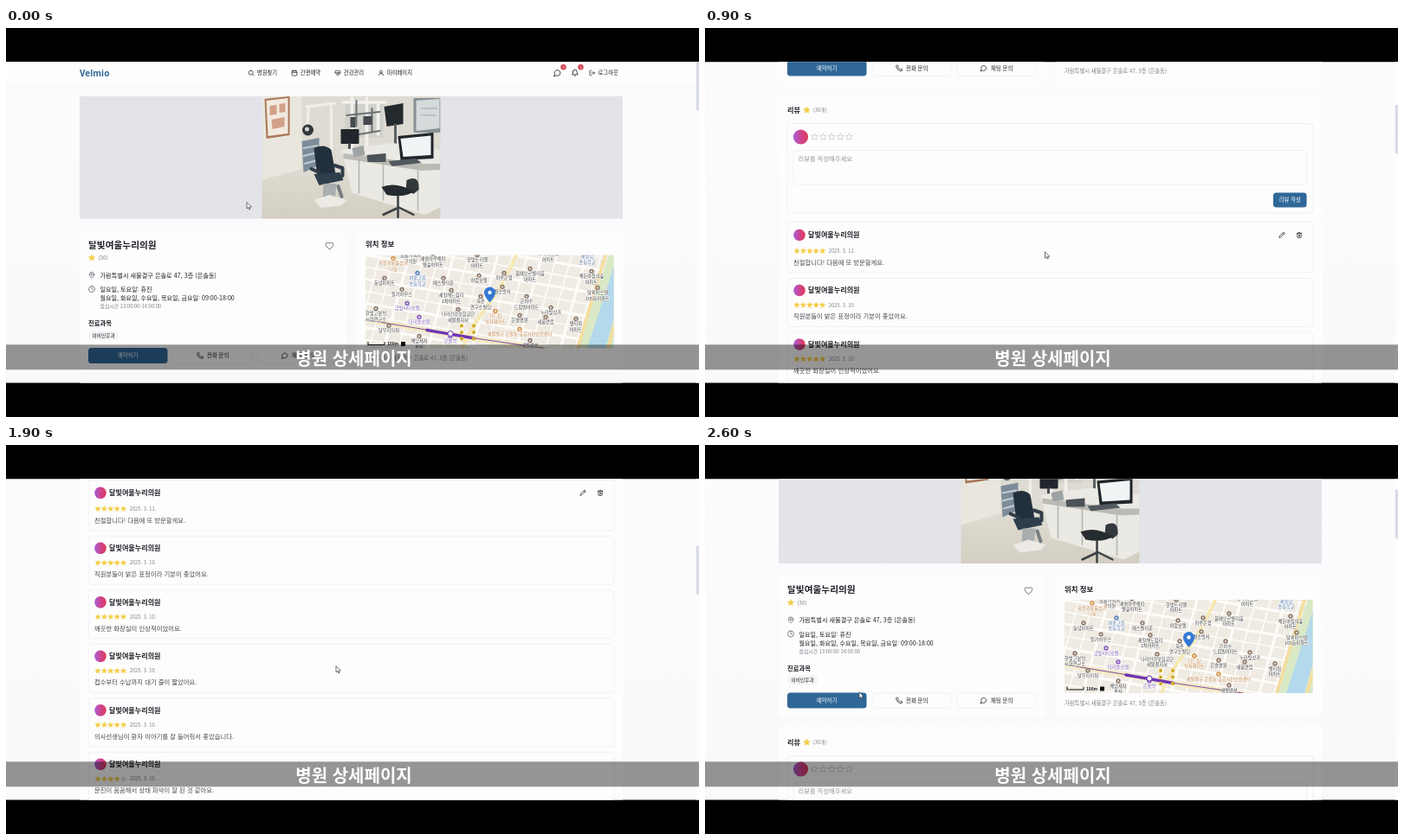
Animation of 800x450 px, one loop 2700 ms. Source, as an HTML page:

```html
<!DOCTYPE html>
<html lang="ko">
<head>
<meta charset="utf-8">
<title>병원 상세페이지</title>
<style>
  html, body { margin: 0; width: 100%; height: 100%; overflow: hidden; background: #000; }
  svg { display: block; width: 800px; height: 450px; }
  text { font-family: "Noto Sans CJK KR", "Noto Sans CJK JP", "Noto Sans CJK", "Noto Sans", sans-serif; }
  .brand { font-family: "Open Sans", "Noto Sans", sans-serif; }
</style>
</head>
<body>
<svg id="stage" viewBox="0 0 800 450" xmlns="http://www.w3.org/2000/svg"></svg>
<script>
const LOOP = 2700, STEP = 100;
const CLINIC = '달빛여울누리의원';
const ADDRESS = '가람특별시 새물결구 은솔로 47, 3층 (은솔동)';
const INK = '#1d1f25', GRAY = '#7b7f88', LINE = '#eeedf2', BLUE = '#2f6798', GOLD = '#f3cf4b';

const ICONS = {
  search: 'M11 3a8 8 0 1 0 0 16a8 8 0 1 0 0-16M21 21l-4.3-4.3',
  calendar: 'M8 2v4M16 2v4M3 10h18M5 4h14a2 2 0 0 1 2 2v14a2 2 0 0 1-2 2H5a2 2 0 0 1-2-2V6a2 2 0 0 1 2-2z',
  heart: 'M19 14c1.5-1.5 3-3.2 3-5.5A5.5 5.5 0 0 0 16.5 3c-1.8 0-3 .5-4.5 2-1.5-1.5-2.7-2-4.5-2A5.5 5.5 0 0 0 2 8.5c0 2.3 1.5 4 3 5.5l7 7Z',
  user: 'M12 13a5 5 0 1 0 0-10a5 5 0 1 0 0 10M20 21a8 8 0 0 0-16 0',
  chat: 'M7.9 20A9 9 0 1 0 4 16.1L2 22Z',
  bell: 'M6 8a6 6 0 0 1 12 0c0 7 3 9 3 9H3s3-2 3-9M10.3 21a2 2 0 0 0 3.4 0',
  logout: 'M9 21H5a2 2 0 0 1-2-2V5a2 2 0 0 1 2-2h4M16 17l5-5-5-5M21 12H9',
  pin: 'M20 10c0 6-8 12-8 12s-8-6-8-12a8 8 0 0 1 16 0ZM12 7a3 3 0 1 0 0 6a3 3 0 1 0 0-6',
  clock: 'M12 2a10 10 0 1 0 0 20a10 10 0 1 0 0-20M12 6v6l4 2',
  phone: 'M22 17v3a2 2 0 0 1-2.2 2A19.8 19.8 0 0 1 2.1 4.2 2 2 0 0 1 4.1 2h3a2 2 0 0 1 2 1.7c.1 1 .4 1.9.7 2.8a2 2 0 0 1-.5 2.1L8 10a16 16 0 0 0 6 6l1.4-1.3a2 2 0 0 1 2.1-.5c.9.3 1.8.6 2.8.7A2 2 0 0 1 22 17z',
  pencil: 'M17 3a2.8 2.8 0 0 1 4 4L7.5 20.5 2 22l1.5-5.5ZM15 5l4 4',
  trash: 'M3 6h18M19 6v14a2 2 0 0 1-2 2H7a2 2 0 0 1-2-2V6M8 6V4a2 2 0 0 1 2-2h4a2 2 0 0 1 2 2v2M10 11v6M14 11v6'
};
ICONS.pulse = ICONS.heart + 'M3 12h6.5l.5-1 2 4.5 2-7 1.5 3.5H21';

// y is the visual middle of the line
const text = (x, y, s, size, fill = INK, more = '') =>
  `<text x="${x}" y="${y + size * 0.37}" font-size="${size}" fill="${fill}" ${more}>${s}</text>`;
const bold = (x, y, s, size, fill = INK) => text(x, y, s, size, fill, 'font-weight="700"');
const medium = (x, y, s, size, fill = INK) => text(x, y, s, size, fill, 'font-weight="500"');
const rect = (x, y, w, h, fill, r = 0, more = '') =>
  `<rect x="${x}" y="${y}" width="${w}" height="${h}" rx="${r}" fill="${fill}" ${more}/>`;
const card = (x, y, w, h) => rect(x, y, w, h, '#fefdfe', 4);
const box = (x, y, w, h, r) => rect(x, y, w, h, '#fefdfe', r, `stroke="${LINE}" stroke-width=".8"`);
const dot = (x, y, r, fill, more = '') => `<circle cx="${x}" cy="${y}" r="${r}" fill="${fill}" ${more}/>`;
const path = (d, fill = 'none', stroke = 'none', w = 1) =>
  `<path d="${d}" fill="${fill}" stroke="${stroke}" stroke-width="${w}" stroke-linejoin="round" stroke-linecap="round"/>`;
const stroke = (d, color, w = 1) => path(d, 'none', color, w);
const icon = (x, y, name, size = 8, color = INK) =>
  `<g transform="translate(${x - size / 2} ${y - size / 2}) scale(${size / 24})">${stroke(ICONS[name], color, 2.3)}</g>`;

function star(x, y, r, fill, line = 'none') {
  const pts = [];
  for (let i = 0; i < 10; i++) {
    const a = i * Math.PI / 5, k = i % 2 ? r * 0.46 : r;
    pts.push((x + k * Math.sin(a)).toFixed(2) + ',' + (y - k * Math.cos(a)).toFixed(2));
  }
  return `<polygon points="${pts.join(' ')}" fill="${fill}" stroke="${line}" stroke-width=".7" stroke-linejoin="round"/>`;
}

function header() {
  const nav = [['search', '병원찾기'], ['calendar', '간편예약'], ['pulse', '건강관리'], ['user', '마이페이지']];
  const badge = (x, n) => dot(x, 45.3, 3.2, '#d6454f') + text(x, 45.3, n, 4, '#fff', 'text-anchor="middle"');
  return rect(0, 39, 797, 27, '#fefdfe') + rect(0, 65.5, 797, 0.7, '#f4f3f7') +
    text(85, 52.5, 'Velmio', 10, BLUE, 'font-weight="700" class="brand"') +
    nav.map(([i, s], k) => icon(283 + k * 50, 52, i, 7.5) + medium(289.8 + k * 50, 52, s, 6.35)).join('') +
    icon(636.5, 52, 'chat', 9) + badge(643.5, 0) + icon(656.8, 52, 'bell', 9) + badge(663.5, 1) +
    icon(676.7, 52, 'logout', 7.5) + medium(683.5, 52, '로그아웃', 6.35);
}

function photo() {
  return '<svg x="295.5" y="79" width="206" height="141.5" viewBox="0 0 206 141.5"><g filter="url(#soft)">' +
    rect(-4, -4, 214, 150, '#dedbd3') + path('M-4 -4H46V84L-4 100Z', '#e9e6de') +
    path('M-4 98L60 80H210V146H-4Z', 'url(#floor)') +
    // poster and cabinet
    path('M3 3L32 0V45L5 49Z', '#a87658') + path('M5 5L30 2V43L7 46Z', '#f2e9df') +
    path('M9 11L17 10V21L9 22ZM20 9L27 8V18L20 19ZM11 27L26 24V35L12 38Z', '#d3a088') +
    path('M46 52L66 48V80L48 88Z', '#7d8c99') + stroke('M48 60L64 57M48 69L64 65M49 78L64 74', '#c3ccd1', 2) +
    // lamp and instrument arms
    stroke('M51 12L84 8M80 10V64M54 13L52 38', '#f0eeea', 3) + dot(53, 39, 6.5, '#33383c') + dot(52, 38, 2.5, '#d3d6d6') +
    rect(96, 8, 44, 40, '#d1d0cb') + stroke('M94 7H142M104 2V60M121 2V64M134 8V44', '#f2f1ed', 3.5) +
    stroke('M109 5V34M127 14V40M98 22L136 18M112 44L136 40', '#6b7174', 2) +
    path('M117 23H127V33H117ZM102 24H108V36H102Z', '#43494d') +
    // screens
    rect(175, 2, 31, 40, '#889197') + path('M178 5L205 3V37L178 40Z', '#d5dadb') + stroke('M184 14H202M184 22H200', '#b2babd', 1.5) +
    path('M141 12L163 8V32L144 35Z', '#24292d') + stroke('M154 33V58', '#5a6165', 3) +
    rect(91, 38, 21, 17, '#20262b', 1) + stroke('M101 55V64', '#444a4f', 3) +
    // desk
    path('M92 62L150 54 206 62V128L188 137 104 112Z', '#ebe9e4') + path('M94 66L186 78H206V85L184 86 94 72Z', '#bbbab5') +
    stroke('M112 70V112M140 74V120M180 86V132', '#b5b4ae', 1.5) +
    path('M157 46L198 42V72L160 74Z', '#20262b') + path('M160 49L195 45.5V68L163 70Z', '#f0f4f4') +
    path('M146 75L178 72 184 77 150 81Z', '#52595e') + path('M121 68L143 66V76H122Z', '#4b5358') +
    path('M104 60L117 57 119 68 106 70Z', '#9da2a3') +
    // treatment chair
    path('M60 60Q72 54 80 62L85 90 64 94Z', '#222f3c') + path('M60 90L90 88 94 97 66 103Z', '#2e3e4d') +
    stroke('M57 84L66 88M84 80L93 83V92', '#313d48', 4) + path('M71 101H86L84 122H70Z', '#a9aeaf') +
    path('M60 120L78 114 98 120 92 126 68 129Z', '#eceae5') + stroke('M88 104L92 116', '#777e82', 4) +
    // stool
    path('M167 97Q182 90 181 108L175 113 166 108Z', '#33383c') + path('M138 105Q154 98 176 110 164 118 144 114Z', '#262b2f') +
    stroke('M157 116V129L140 137M157 128L175 137M157 128V140', '#3b4043', 2.5) + '</g></svg>';
}

const PLACES = [
  [52, 1, 0, '늘봄가득치', '과의원'], [78, 5, 0, '새솔마루해피', '별숲아파트'], [129, 6, 0, '한빛트리엘', '아파트'],
  [211, -1, 0, '나루파스텔', '아파트'], [256, 2, 2, '새들녘', '초등학교'], [32, 10, 1, '자전거용품상가', '나동'],
  [22, 33, 0, '동녘아파트'], [60, 27, 2, '여울고을', '초등학교'], [90, 33, 0, '에스별타운'], [131, 30, 0, '하람호텔'],
  [160, 27, 0, '마루은행'], [190, 22, 0, '봄에오르별리움', '아파트'], [261, 25, 0, '해든아침의숲', '아파트'],
  [42, 46, 0, '들가하우스'], [99, 47, 0, '새일해드림리', '2차아파트'], [133, 54, 0, '북촌', '연구소빌딩'],
  [158, 43, 0, '별소방서'], [186, 54, 0, '은하수', '드림빌아파트'], [268, 44, 0, '달록파스텔', '105동아파트'],
  [48, 62, 3, '금빛씨티호텔'], [107, 69, 0, '나라건강보험공단', '새물결지사'], [150, 71, 1, '다드림', '식자재마트'],
  [178, 76, 0, '은솔병원'], [214, 67, 0, '누리빛상가'], [208, 78, 0, '새봄연립'], [243, 80, 0, '별타워', '아파트'],
  [12, 68, 0, '한빛고분석', '시험연구소'], [62, 78, 3, '다리솔호텔'], [27, 88, 0, '달무리타워'], [62, 100, 0, '해담제지', '본사'],
  [98, 100, 3, '은솔역'], [190, 105, 0, '새별맨션'], [178, 92, 1, '새물결구 은솔동 공공시민안전센터']
];

function map() {
  const tones = ['#3f3d3d', '#bd7a3c', '#4d74ac', '#7c58b5'], marks = ['#8e7b6b', '#d59750', '#5d86bd', '#8a62c0'];
  let s = '<svg x="415" y="262.5" width="286.5" height="108" viewBox="0 0 286.5 108">' + rect(0, 0, 287, 108, '#efebe3');
  for (let i = 0; i < 20; i++) s += stroke(`M${i * 17} 0L${i * 17 - 30} 108`, '#fdfcf9', i % 3 ? 1.6 : 3);
  for (let i = -4; i < 9; i++) s += stroke(`M0 ${i * 14}L287 ${i * 14 + 48}`, '#fdfcf9', i % 2 ? 1.6 : 3);
  s += path('M281 0H287V108H244Z', '#d9e9c6') + path('M287 12V72L277 108H256Z', '#b4d9ec') +
    stroke('M277 0L245 108M287 82L280 108', '#f5dd9c', 3.5) +
    stroke('M174 0Q160 34 140 60T112 108', '#f7e8b4', 4) + stroke('M0 75L70 87 127 97 205 108', '#f6eab9', 5) +
    stroke('M0 75L70 86.5 127 96.5 206 108', '#8054b8', 1.2) + stroke('M71 87L126 96.5', '#6f35b5', 3.4);
  for (const [x, y, kind, ...lines] of PLACES) {
    s += dot(x, y - 6, 2.7, marks[kind]) + dot(x, y - 6, 0.9, '#fff');
    lines.forEach((l, i) => s += text(x, y + i * 6.3, l, 5.2, tones[kind],
      'text-anchor="middle" font-weight="500" stroke="#fff" stroke-width=".9" paint-order="stroke"'));
  }
  for (let i = 0; i < 6; i++) {
    const x = 111 + i % 2 * 14, y = 82 + (i >> 1) * 7.5;
    s += dot(x, y, 2.2, '#ecc53c') + dot(x, y, 0.8, '#6b5a1c');
  }
  s += dot(98, 91, 3, '#fff', 'stroke="#6f35b5"') +
    path('M143.5 55Q137 48 137 43.5A6.3 6.3 0 0 1 150 43.5Q150 48 143.5 55Z', '#3578d4') + dot(143.5, 43.5, 2.2, '#fff') +
    stroke('M3 101V104H22V101', '#111', 1.1) + bold(25, 103, '100m', 4.8, '#111') + rect(41, 100.5, 5, 5, '#111');
  return s + '</svg>';
}

function info() {
  return card(85, 234.5, 307, 163.5) + card(405, 234.5, 307, 163.5) +
    bold(95, 251, CLINIC, 10.7) + icon(373.5, 252.3, 'heart', 10.5, '#8b8f97') +
    star(99, 266, 4.6, GOLD) + text(106.5, 266, '(30)', 6.2, GRAY) +
    icon(99, 286, 'pin', 8.5, '#656a73') + text(108.5, 286, ADDRESS, 7.18) +
    icon(99, 302, 'clock', 8.5, '#656a73') + text(108.5, 302.5, '일요일, 토요일: 휴진', 7.08) +
    text(108.5, 312.5, '월요일, 화요일, 수요일, 목요일, 금요일: 09:00-18:00', 7.08) +
    text(108.5, 322, '점심시간 13:00:00-14:00:00', 5.85, GRAY) +
    bold(95, 341.3, '진료과목', 7.3) + rect(95, 350, 35, 11, '#f4f4f7', 5.5) + medium(99.5, 355.5, '이비인후과', 5.7) +
    rect(95, 370, 91.5, 18, BLUE, 3.5) + medium(129, 379, '예약하기', 6.35, '#fff') +
    box(193, 370.3, 91, 17.5, 3.5) + icon(224, 379, 'phone', 8) + medium(232, 379, '전화 문의', 6.4) +
    box(290.5, 370.3, 91.5, 17.5, 3.5) + icon(321.7, 379, 'chat', 8) + medium(330, 379, '채팅 문의', 6.4) +
    bold(415, 250, '위치 정보', 8.4) + map() + text(415, 382, ADDRESS, 6.3, GRAY);
}

const REVIEWS = [
  '친절합니다! 다음에 또 방문할게요.', '직원분들이 밝은 표정이라 기분이 좋았어요.', '깨끗한 화장실이 인상적이었어요.',
  '접수부터 수납까지 대기 줄이 짧았어요.', '의사선생님이 환자 이야기를 잘 들어줘서 좋았습니다.', '문진이 꼼꼼해서 상태 파악이 잘 된 것 같아요.',
  '병원 안이 환하게 조명되어 편안했습니다.', '설명을 자세히 해주셔서 좋았어요.', '예약이 편리해서 좋았어요.'
];

function review(s, i) {
  const top = i ? 559.5 + 62.5 * i : 557, name = top + (i ? 14 : 15), row = name + (i ? 17 : 18.5);
  let out = box(95, top, 607, i ? 56 : 58.5, 4) + dot(109, name, 6.8, 'url(#face)') + bold(119, name, CLINIC, 8.1);
  for (let k = 0; k < 5; k++) out += star(106 + k * 7.4, row, 3.9, i === 5 && k === 4 ? '#d9dae2' : GOLD);
  if (!i) out += icon(666, name, 'pencil', 7.5) + icon(686, name, 'trash', 7.5);
  return out + text(142.7, row, i ? '2025. 3. 10.' : '2025. 3. 11.', 5.8, GRAY) + text(102, row + 13, s, 7.35, '#45484f');
}

function reviews() {
  let s = card(85, 409, 627, 2000) + bold(95, 427.5, '리뷰', 8.15) + star(117.5, 427.5, 4.7, GOLD) +
    text(124.8, 427.5, '(30개)', 5.9, GRAY) + box(95, 443, 607, 103.5, 4) + dot(110.5, 458.5, 8.6, 'url(#face)');
  for (let k = 0; k < 5; k++) s += star(126.3 + k * 10, 458.5, 4.2, 'none', '#bfc2ca');
  return s + box(102, 474, 592.5, 39.5, 3.5) + text(107.5, 484, '리뷰를 작성해주세요', 7.3, '#94979f') +
    rect(656, 523, 38.5, 17, BLUE, 3.5) + medium(662.7, 531.5, '리뷰 작성', 6.4, '#fff') + REVIEWS.map(review).join('');
}

const gradient = (id, dir, ...stops) => `<linearGradient id="${id}" ${dir}>` +
  stops.map((c, i) => `<stop offset="${i / (stops.length - 1)}" stop-color="${c}"/>`).join('') + '</linearGradient>';

const stage = document.getElementById('stage');
stage.innerHTML = '<defs>' + gradient('face', '', '#a75fd8', '#cd4593', '#df3a55') +
  gradient('wash', 'x2="0" y2="1"', '#fcfbfd', '#f9f8fa') + gradient('floor', 'x2="0" y2="1"', '#dfdcd2', '#d2cdc0') +
  '<filter id="soft"><feGaussianBlur stdDeviation=".6"/></filter>' +
  '<clipPath id="view"><rect y="39.3" width="800" height="371.3"/></clipPath></defs>' +
  rect(0, 0, 800, 450, '#000') + '<g clip-path="url(#view)">' + rect(0, 39, 800, 372, 'url(#wash)') +
  '<g id="page">' + header() + rect(85, 79, 627, 141.5, '#e3e4ea') + photo() + info() + reviews() + '</g>' +
  rect(796.5, 39, 3.5, 372, '#fdfdfe') + `<g id="thumb">${rect(796.7, 39, 3.3, 56.5, '#d6dbe6', 1)}</g>` +
  `<g id="cursor">${path('M0 0V7L1.7 5.5 2.8 8 4 7.4 2.9 5.1H5Z', '#fff', '#33353b', 0.7)}</g></g>` +
  rect(0, 366.3, 800, 29, 'rgba(0,0,0,.41)') +
  text(401.5, 382.7, '병원 상세페이지', 20, '#fff', 'font-weight="700" text-anchor="middle"');

// rows: time, value...
const SCROLL = [[0, 0], [600, 0], [700, 188], [1100, 477], [1300, 588], [1500, 625], [1600, 632], [1700, 628],
  [1800, 588], [2100, 374], [2400, 145], [2600, 83.5]];
const POINTER = [[0, 278, 202], [100, 278, 202], [700, 403, 262], [1100, 382, 256.5], [1500, 381, 256], [2400, 381, 256], [2600, 178, 286]];

function at(rows, t) {
  const n = rows.findIndex(r => r[0] > t);
  if (n < 0) return rows[rows.length - 1].slice(1);
  const a = rows[n - 1], b = rows[n], k = (t - a[0]) / (b[0] - a[0]);
  return a.slice(1).map((v, i) => v + (b[i + 1] - v) * k);
}

const move = (id, x, y) => document.getElementById(id).setAttribute('transform', `translate(${x} ${y})`);
const start = performance.now();

function draw() {
  const t = Math.floor((performance.now() - start) % LOOP / STEP) * STEP;
  const [y] = at(SCROLL, t);
  move('page', 0, -y);
  move('thumb', 0, y * 0.15);
  move('cursor', ...at(POINTER, t));
  requestAnimationFrame(draw);
}
draw();
</script>
</body>
</html>
```
